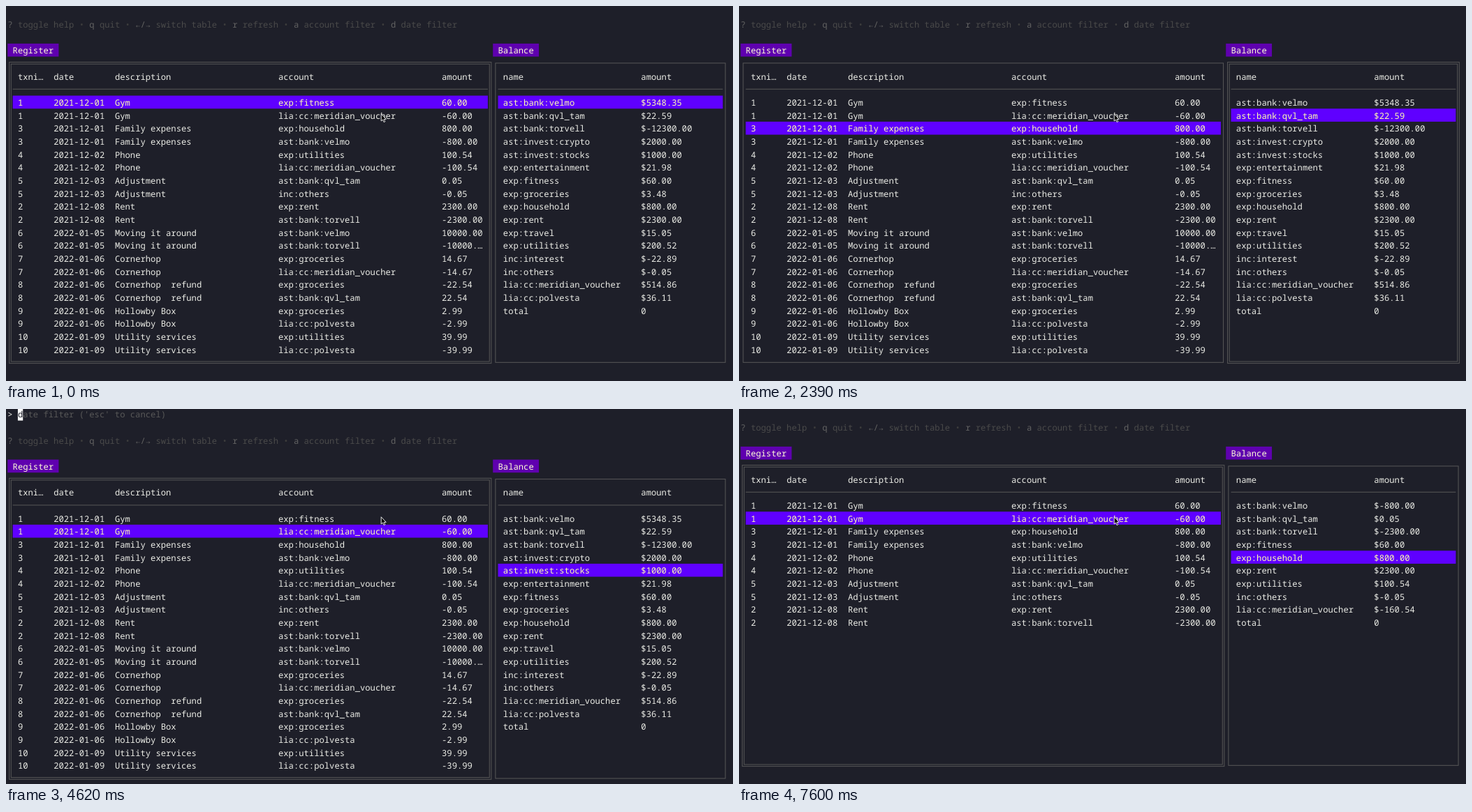
An HTML page that plays this animation: 1041 px wide and 538 px high, repeating every 8000 ms.

```html
<!DOCTYPE html>
<html lang="en">
<head>
<meta charset="utf-8">
<title>Ledger terminal</title>
<style>
  html, body { margin: 0; height: 100%; overflow: hidden; background: #1e1f29; }
  svg { display: block; width: 100vw; height: 100vh; }
  text {
    font: 12.19px "Noto Sans Mono", "DejaVu Sans Mono", monospace;
    white-space: pre;
    text-rendering: geometricPrecision;
  }
</style>
</head>
<body>
<svg id="stage" viewBox="0 0 1041 538"></svg>
<script>
const LOOP = 8000, CELL = 7.315, LINE = 18.67;
const FG = '#ebece6', BG = '#1e1f29', GREY = '#585858';
const stage = document.getElementById('stage');

const BANKS = { A: 'ast:bank:velmo', B: 'ast:bank:qvl_tam', C: 'ast:bank:torvell' };
const CARDS = { D: 'lia:cc:meridian_voucher', E: 'lia:cc:polvesta' };
const SHORT = { ...BANKS, ...CARDS };
const account = key => SHORT[key] || key;

// Each transaction becomes two register lines with opposite amounts.
const transactions = [
  [1, '2021-12-01', 'Gym', 'exp:fitness', '60.00', 'D', '-60.00'],
  [3, '2021-12-01', 'Family expenses', 'exp:household', '800.00', 'A', '-800.00'],
  [4, '2021-12-02', 'Phone', 'exp:utilities', '100.54', 'D', '-100.54'],
  [5, '2021-12-03', 'Adjustment', 'B', '0.05', 'inc:others', '-0.05'],
  [2, '2021-12-08', 'Rent', 'exp:rent', '2300.00', 'C', '-2300.00'],
  [6, '2022-01-05', 'Moving it around', 'A', '10000.00', 'C', '-10000.…'],
  [7, '2022-01-06', 'Cornerhop', 'exp:groceries', '14.67', 'D', '-14.67'],
  [8, '2022-01-06', 'Cornerhop  refund', 'exp:groceries', '-22.54', 'B', '22.54'],
  [9, '2022-01-06', 'Hollowby Box', 'exp:groceries', '2.99', 'E', '-2.99'],
  [10, '2022-01-09', 'Utility services', 'exp:utilities', '39.99', 'E', '-39.99']
];
const register = transactions.flatMap(([id, date, text, to, plus, from, minus]) =>
  [[id, date, text, account(to), plus], [id, date, text, account(from), minus]]);

const parseBalance = list => list.split(' ').map(item => {
  const [key, amount] = item.split('=');
  return [account(key), key === 'total' ? amount : '$' + amount];
});
const fullBalance = parseBalance('A=5348.35 B=22.59 C=-12300.00 ast:invest:crypto=2000.00 ' +
  'ast:invest:stocks=1000.00 exp:entertainment=21.98 exp:fitness=60.00 exp:groceries=3.48 ' +
  'exp:household=800.00 exp:rent=2300.00 exp:travel=15.05 exp:utilities=200.52 ' +
  'inc:interest=-22.89 inc:others=-0.05 D=514.86 E=36.11 total=0');
const lastYearBalance = parseBalance('A=-800.00 B=0.05 C=-2300.00 exp:fitness=60.00 ' +
  'exp:household=800.00 exp:rent=2300.00 exp:utilities=100.54 inc:others=-0.05 D=-160.54 total=0');

const timeline = [
  [0, { active: 0, reg: 0, bal: 0, typed: null, filtered: false }],
  [1350, { reg: 1 }], [1500, { reg: 2 }], [1790, { active: 1 }],
  [2390, { bal: 1 }], [2530, { bal: 2 }], [2680, { bal: 3 }], [2820, { bal: 4 }],
  [3120, { active: 0 }], [3270, { reg: 1 }],
  [4620, { typed: 0 }], [5820, { typed: 1 }], [5960, { typed: 3 }],
  [6260, { typed: 4 }], [6410, { typed: 5 }], [6550, { typed: 6 }],
  [6700, { typed: 7 }], [6850, { typed: 8 }], [7000, { typed: 9 }],
  [7600, { typed: null, filtered: true }]
];

const colX = col => 2.3 + col * CELL;
const rowY = row => row * LINE - 2.1;
const text = (col, row, str, fill = FG) =>
  `<text x="${colX(col)}" y="${rowY(row) + 14.4}" fill="${fill}">${str}</text>`;
const block = (col, row, cols, fill) =>
  `<rect x="${colX(col)}" y="${rowY(row)}" width="${cols * CELL}" height="${LINE}" fill="${fill}"/>`;

// Border lines run through the middle of the cells; the active box is doubled.
function frame(first, last, top, active) {
  const x = colX(first + .5), y = rowY(top + .5);
  const w = (last - first) * CELL, h = 23 * LINE;
  return (active ? [-1.3, 1.3] : [0]).map(d =>
    `<rect x="${x + d}" y="${y + d}" width="${w - 2 * d}" height="${h - 2 * d}" fill="none" stroke="${GREY}"/>`
  ).join('');
}

function table({ title, first, last, cols, heads, rows, selected, active }, top) {
  const line = (cells, row, fill) => cells.map((cell, i) => text(cols[i], row, cell, fill)).join('');
  const ruleY = rowY(top + 3.5);
  return block(first, top - 1, title.length + 2, '#5f00af') +
    text(first + 1, top - 1, title, '#ffffd7') +
    frame(first, last, top, active) +
    line(heads, top + 1) +
    `<path d="M${colX(first + 1)} ${ruleY - LINE}H${colX(last)}" stroke="${GREY}"/>` +
    block(first + 1, top + 3 + selected, last - first - 1, '#5f00ff') +
    rows.map((cells, i) => line(cells, top + 3 + i, i === selected ? '#ffffaf' : FG)).join('');
}

function help(row) {
  const entries = [['?', 'toggle help'], ['q', 'quit'], ['←/→', 'switch table'],
    ['r', 'refresh'], ['a', 'account filter'], ['d', 'date filter']];
  let col = 0;
  return entries.map(([key, label], i) => {
    let out = i ? text(col - 2, row, '•', '#3c3c3c') : '';
    out += [...key].map((ch, k) => text(col + k, row, ch, '#626262')).join('');
    out += text(col + key.length + 1, row, label, '#4a4a4a');
    col += key.length + label.length + 4;
    return out;
  }).join('');
}

function prompt(typed) {
  const cursor = block(2 + typed, 0, 1, '#ffffff');
  const content = typed
    ? text(2, 0, 'last year'.slice(0, typed))
    : text(2, 0, 'd', BG) + text(3, 0, "ate filter ('esc' to cancel)", GREY);
  return text(0, 0, '&gt;') + cursor + content;
}

const pointer = '<path d="M537.2 154.8v10.2l2.3-2 1.6 3.6 1.7-.8-1.6-3.4h3z" ' +
  'fill="#000" stroke="#fff" stroke-width=".9"/>';

function render({ active, reg, bal, typed, filtered }) {
  const shift = typed === null ? 0 : 1;
  stage.innerHTML = (shift ? prompt(typed) : '') + help(1 + shift) +
    table({
      title: 'Register', first: 0, last: 94, cols: [2, 9, 21, 53, 85],
      heads: ['txni…', 'date', 'description', 'account', 'amount'],
      rows: filtered ? register.slice(0, 10) : register,
      selected: reg, active: active === 0
    }, 4 + shift) +
    table({
      title: 'Balance', first: 95, last: 140, cols: [97, 124],
      heads: ['name', 'amount'],
      rows: filtered ? lastYearBalance : fullBalance,
      selected: bal, active: active === 1
    }, 4 + shift) + pointer;
}

const start = performance.now();
let shown = 0;
function tick() {
  const time = (performance.now() - start) % LOOP;
  const past = timeline.filter(([at]) => at <= time);
  if (past.length !== shown) {
    shown = past.length;
    render(Object.assign({}, ...past.map(([, change]) => change)));
  }
  requestAnimationFrame(tick);
}
tick();
</script>
</body>
</html>
```
